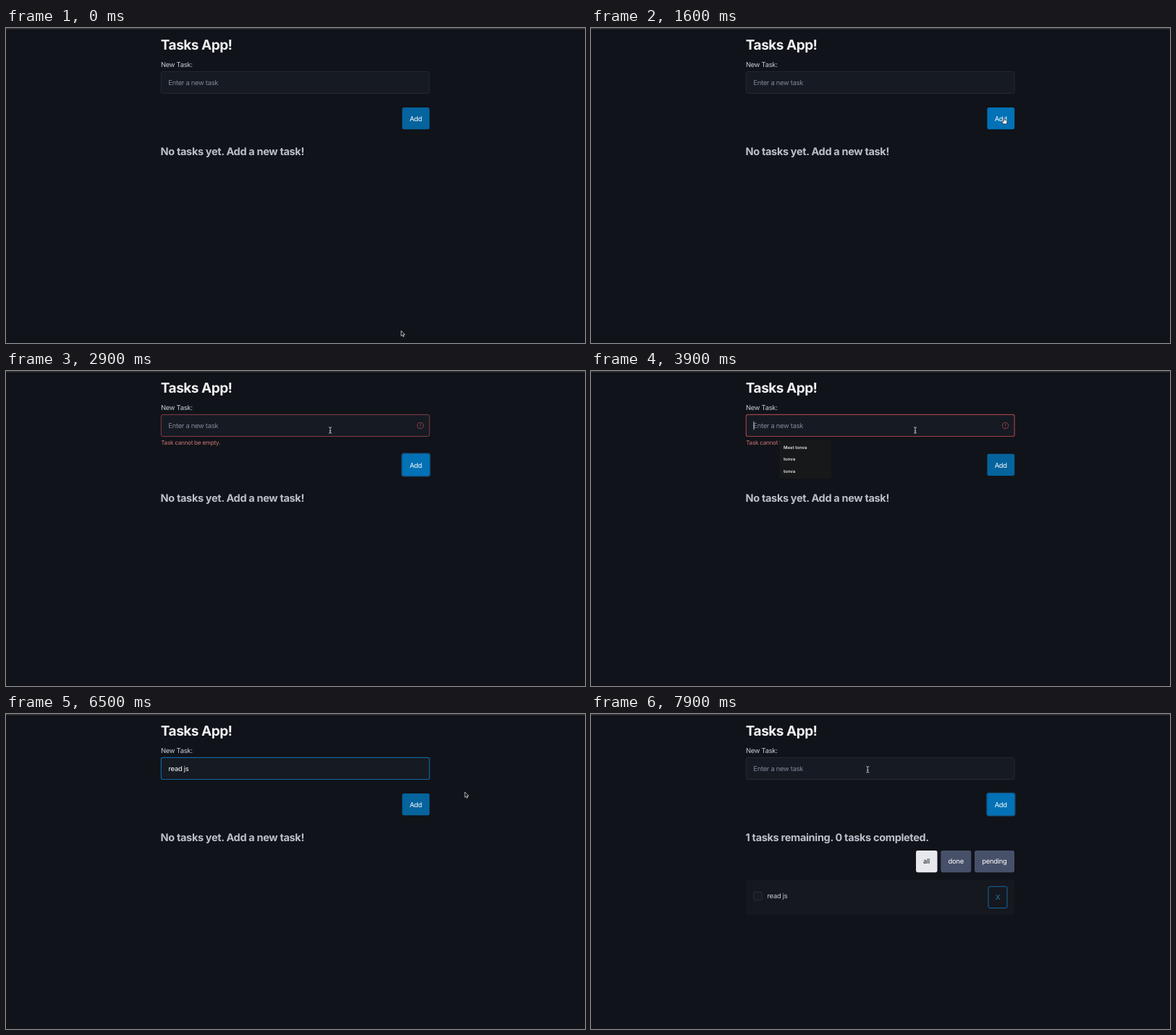
Animation of 800x436 px, one loop 8000 ms. Source, as an HTML page:

```html
<!DOCTYPE html>
<html lang="en">
<head>
<meta charset="utf-8">
<title>Tasks App</title>
<style>
  html, body { margin: 0; width: 100%; height: 100%; overflow: hidden; background: #101319; }
  svg { display: block; width: 100vw; height: 100vh; }
  text {
    font: 400 9.4px Inter, "Liberation Sans", sans-serif;
    letter-spacing: -.029em;
    fill: #c8ccd4;
    text-rendering: geometricPrecision;
    white-space: pre;
  }
  .title { font-size: 19px; font-weight: 700; letter-spacing: -.026em; fill: #f0f1f3; }
  .summary { font-size: 14.5px; font-weight: 700; letter-spacing: -.023em; fill: #bcc0cb; }
  .hint { fill: #80879a; }
  .on { fill: #fff; }
  .mid { text-anchor: middle; }
  .small { font-size: 8.1px; fill: #ca7875; }
  .menu text { font-size: 6px; font-weight: 600; letter-spacing: 0; fill: #e8e8e8; }
</style>
</head>
<body>
<svg viewBox="0 0 800 436" preserveAspectRatio="none">
  <rect width="800" height="436" fill="#101319"/>
  <rect width="800" height="1.7" fill="#313236"/>
  <text class="title" x="213.8" y="29.8">Tasks App!</text>
  <text x="214" y="54">New Task:</text>

  <rect id="field" x="214.3" y="60.4" width="370.8" height="30.1" rx="2.4" fill="#161a22"/>
  <text id="hint" class="hint" x="224.3" y="79">Enter a new task</text>
  <text id="typed" class="on" x="224.5" y="79"></text>
  <rect id="caret" y="69.8" width=".9" height="11.4" fill="#d5d8de"/>

  <g id="error">
    <g fill="none" stroke="#9a454a" stroke-width=".9">
      <circle cx="572.5" cy="75.6" r="4.1"/>
      <path d="M572.5 73.3v2.7M572.5 77.3v.9"/>
    </g>
    <text class="small" x="214.2" y="102.2">Task cannot be empty.</text>
  </g>

  <g id="lower">
    <rect id="ring" x="546.9" y="109.5" width="38.9" height="31.3" rx="3" fill="none" stroke="#17527f" stroke-width="1.4"/>
    <rect id="add" x="547.4" y="110" width="37.8" height="30.3" rx="2.4"/>
    <text class="on mid" x="566.2" y="128.9">Add</text>
    <text id="summary" class="summary" x="213.6" y="176.2"></text>
  </g>

  <g id="list">
    <rect x="449" y="189" width="29.5" height="30.2" rx="2.4" fill="#e7e8ed"/>
    <text class="mid" x="463.6" y="207.4" style="fill:#1b1e26">all</text>
    <rect x="483.3" y="189" width="42" height="30.2" rx="2.4" fill="#475069"/>
    <text class="on mid" x="504.2" y="207.4">done</text>
    <rect x="530" y="189" width="55" height="30.2" rx="2.4" fill="#475069"/>
    <text class="on mid" x="557.4" y="207.4">pending</text>
    <g id="card">
      <rect x="214.5" y="229.6" width="370.5" height="48.4" rx="2.4" fill="#15181e"/>
      <rect x="224.9" y="246.6" width="11.2" height="11.2" rx="2" fill="#161a22" stroke="#2a303b"/>
      <text x="243.5" y="255.4">read js</text>
      <rect x="549" y="238.8" width="26" height="29.8" rx="2.4" fill="none" stroke="#126aa6"/>
      <text class="mid" x="562" y="257.2" style="fill:#2180c0">X</text>
    </g>
  </g>

  <g id="menu" class="menu">
    <rect x="260.5" y="95.5" width="71.5" height="53.5" rx="2" fill="#17181a"/>
    <text x="266" y="107.5">Meet tonva</text>
    <text x="266" y="124.2">tonva</text>
    <text x="266" y="140.9">tonva</text>
  </g>

  <g id="cursor">
    <path id="arrow" d="M0 0V7.4L1.7 5.9 2.8 8.3 4 7.8 2.9 5.4H5.2Z" fill="#08090b" stroke="#dcdde0" stroke-width=".8" stroke-linejoin="round"/>
    <path id="hand" d="M-.8 .5Q0-.5.8.5V3L3 3.5Q4 3.8 3.9 5L3.4 8.3H-1.3L-3.1 5.3Q-3.1 4.1-.8 5Z" fill="#f3f3f3" stroke="#14171c" stroke-width=".6"/>
    <path id="beam" d="M-2-4.2Q0-4.2 0-3 0-4.2 2-4.2M0-3V3M-2 4.2Q0 4.2 0 3 0 4.2 2 4.2M-1.1 .9H1.1" fill="none" stroke="#cfd1d5" stroke-width=".9"/>
  </g>
</svg>
<script>
const LOOP = 8000, STEP = 100;
const FAIL = 1800, FOCUS = 3700, TYPE = 4300, DONE = 7100;

// Rows: time, then one or more values.
const pointer = [
  [100, 546, 419], [400, 400, 260], [600, 194, 140], [800, 330, 48],
  [1000, 652, 60], [1200, 610, 130], [1500, 571, 124.5], [1900, 571, 124.5],
  [2200, 528.3, 122], [2600, 462, 92], [2900, 448, 82], [6100, 448, 82],
  [6500, 634, 108], [6800, 568, 129], [7100, 568, 129], [7400, 520, 108], [7900, 382.3, 76.8]
];
const glow = [[1400, 0], [1600, 1], [3700, 1], [3900, 0], [6600, 0], [6800, 1]];
const slide = [[7000, 145, 0], [7100, 129, .09], [7200, 72, .5], [7300, 25, .83], [7400, 0, 1]];
const typing = [[TYPE, "r"], [4500, "re"], [4700, "rea"], [4900, "read"], [5200, "read "], [5900, "read js"], [DONE, ""]];
const caretX = { "": 224.5, r: 228, re: 233, rea: 238, read: 243.3, "read ": 245.4, "read js": 253 };

const el = {};
document.querySelectorAll("[id]").forEach(node => el[node.id] = node);

const show = (node, on) => node.style.display = on ? "" : "none";
const within = (t, from, to) => t >= from && t < to;
const set = (node, attrs) => {
  for (const name in attrs) node.setAttribute(name, attrs[name]);
};

function track(rows, t) {
  const next = rows.findIndex(row => row[0] > t);
  if (next === 0) return rows[0].slice(1);
  if (next < 0) return rows[rows.length - 1].slice(1);
  const a = rows[next - 1], b = rows[next];
  const k = (t - a[0]) / (b[0] - a[0]);
  return a.slice(1).map((v, i) => v + (b[i + 1] - v) * k);
}

function drawPointer(t, drop) {
  const [x, y] = track(pointer, t);
  const onAdd = x > 547 && x < 585 && y > 110 + drop && y < 140 + drop;
  const onField = x > 214 && x < 585 && y > 60 && y < 90;
  set(el.cursor, { transform: `translate(${x} ${y})` });
  show(el.cursor, !within(t, TYPE, 6200));
  show(el.hand, onAdd);
  show(el.beam, onField);
  show(el.arrow, !onAdd && !onField);
}

function drawField(t, failed) {
  const focused = within(t, FOCUS, 7000);
  const row = typing.filter(r => r[0] <= t).pop() || [FOCUS, ""];
  const text = row[1];
  let stroke = "#232934";
  if (failed) stroke = focused ? "#9c4047" : "#843d44";
  else if (focused) stroke = "#0f659e";
  set(el.field, { stroke, "stroke-width": focused ? 1.2 : 1 });
  el.typed.textContent = text;
  show(el.hint, !text);
  set(el.caret, { x: caretX[text] });
  show(el.caret, focused && (t - row[0]) % 1000 < 500);
}

function draw(t) {
  const failed = within(t, FAIL, TYPE);
  const done = t >= DONE;
  const drop = failed ? 4.8 : 0;

  drawField(t, failed);
  show(el.error, failed);
  show(el.menu, within(t, 3800, TYPE));

  const [g] = track(glow, t);
  set(el.lower, { transform: `translate(0 ${drop})` });
  set(el.add, { fill: `rgb(${5 - 3 * g} ${100 + 13 * g} ${157 + 25 * g})` });
  show(el.ring, within(t, FAIL, FOCUS) || t >= 7000);
  el.summary.textContent = done
    ? "1 tasks remaining. 0 tasks completed."
    : "No tasks yet. Add a new task!";

  show(el.list, done);
  const [shift, opacity] = track(slide, t);
  set(el.card, { transform: `translate(${shift} 0)`, opacity });

  drawPointer(t, drop);
}

function tick() {
  const t = performance.now() % LOOP;
  draw(Math.floor(t / STEP) * STEP);
  requestAnimationFrame(tick);
}
tick();
</script>
</body>
</html>
```
